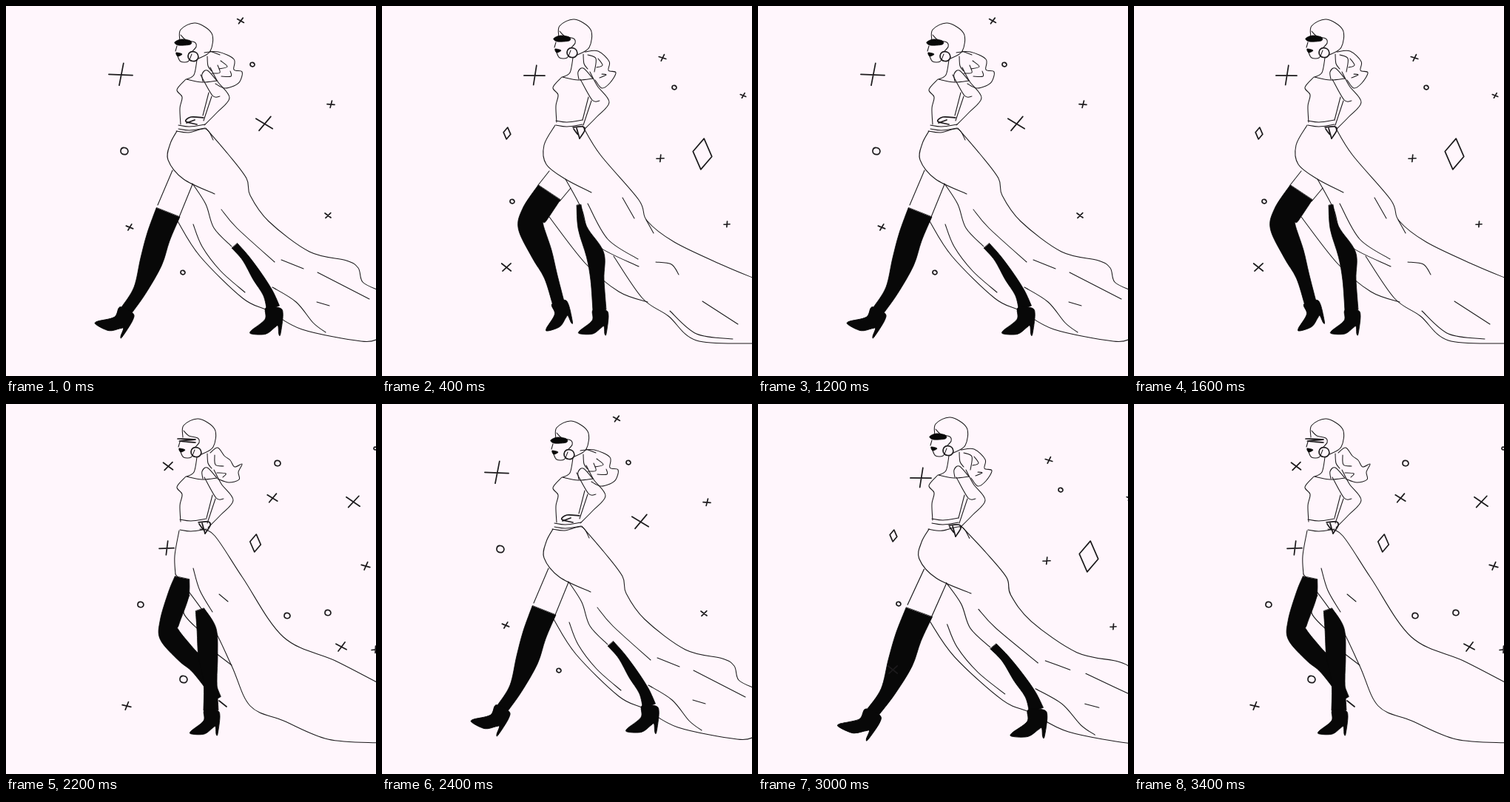
These frames come from a looping animation (500x500 px, 3600 ms). An HTML page:

```html
<!DOCTYPE html>
<html>
<head>
<meta charset="utf-8">
<title>Runway walk</title>
<style>
html, body { margin: 0; width: 100%; height: 100%; overflow: hidden; background: #fff6fc; }
svg { display: block; width: 100vw; height: 100vh; }
path { fill: none; stroke: #1c1a1c; stroke-width: 1.05; stroke-linecap: round; stroke-linejoin: round; }
path.fill { fill: #080808; stroke: #080808; stroke-width: .8; }
path.bold { stroke-width: 1.7; }
</style>
</head>
<body>
<svg id="stage" viewBox="0 0 500 500"></svg>
<script>
const parse = text => text.split(" ").map(p => p.split(",").map(Number));
const path = (d, kind = "") => `<path class="${kind}" d="${d}"/>`;
const group = (transform, content) => `<g transform="${transform}">${content}</g>`;
const move = (offset, content) => group(`translate(${offset})`, content);

// Smooth curve through the points.
function curve(points, closed) {
  const n = points.length;
  const at = i => closed ? points[(i + n) % n] : points[Math.max(0, Math.min(n - 1, i))];
  let d = "M" + points[0];
  for (let i = 0; i < (closed ? n : n - 1); i++) {
    const [a, b, c, e] = [at(i - 1), at(i), at(i + 1), at(i + 2)];
    const near = b.map((v, k) => v + (c[k] - a[k]) / 6);
    const far = c.map((v, k) => v - (e[k] - b[k]) / 6);
    d += `C${near} ${far} ${c}`;
  }
  return d;
}
const line = text => path(curve(parse(text)));
const bold = text => path(curve(parse(text)), "bold");
const blob = text => path(curve(parse(text), true), "fill");
const lines = (...texts) => texts.map(line).join("");

const shoeShape = blob("-9,0 -10,14 -27,28 -26,32 -9,32 2,24 6,22 7,32 9,32 12,8 8,0");

// A boot follows x,y,half-width stations; the shoe hangs on the last one.
function boot(stations, turn, size) {
  const spine = parse(stations);
  const side = sign => spine.map(([x, y, w], i) => {
    const [ax, ay] = spine[Math.max(0, i - 1)];
    const [bx, by] = spine[Math.min(spine.length - 1, i + 1)];
    const k = sign * w / Math.hypot(bx - ax, by - ay);
    return [x + (by - ay) * k, y - (bx - ax) * k];
  });
  const outline = curve(side(1)) + curve(side(-1).reverse()).replace("M", "L") + "Z";
  const [x, y] = spine.at(-1);
  const shoe = size ? group(`translate(${x} ${y}) rotate(${turn}) scale(${size})`, shoeShape) : "";
  return path(outline, "fill") + shoe;
}

function sparkle(item) {
  const [x, y, r] = item.slice(1).split(",").map(Number);
  const kind = item[0];
  const turn = kind === "+" ? (x * 7 + y) % 45 : 6;
  const shapes = {
    "+": `M${-r},${r * .1}L${r},${-r * .1}M${r * .1},${-r}L0,${r * .9}`,
    o: `M${r},0C${r},${r * 1.3} ${-r},${r * 1.2} ${-r},0S${r * .8},${-r * 1.2} ${r},0`,
    d: `M0,${-r}L${r * .62},${r * .1}L0,${r}L${-r * .62},${-r * .1}Z`
  };
  return group(`translate(${x} ${y}) rotate(${turn})`, path(shapes[kind], "bold"));
}
const sparkles = text => text.split(" ").map(sparkle).join("");

const head = lines(
  "239,43 240,27 260,18 282,32 280,56 264,66",
  "240,34 247,41 259,44 261,50 256,56",
  "235,49 233,56",
  "236,63 240,70 250,70 255,60"
) + blob("234,58 242,60 236,63") + sparkle("o257,63,7");
const shades = blob("232,44 241,40 253,42 253,47 237,48");
const scribble = bold("232,45 256,46 234,48 256,50");
const torso = lines(
  "258,70 254,90 244,96",
  "272,65 273,78 278,85",
  "244,96 265,100 285,98",
  "266,99 265,89 272,84 285,98",
  "243,96 231,110 238,120 235,135 236,157"
);
const arm = lines(
  "281,89 291,108 307,130 290,150 273,167",
  "268,99 284,127 294,128",
  "283,128 272,161",
  "279,123 271,154"
);
const waist = line("235,155 250,157 271,154");
const fist = bold("258,164 271,163 274,168 267,179") + bold("259,166 265,174 263,165 267,179");
const flatHand = bold("267,151 250,150 243,156 258,160") + bold("244,158 255,154");

const upper = (headAt, torsoAt, armAt, waistAt, depth, eyes, hand, tail) =>
  move(headAt, head + eyes) + move(torsoAt, torso) + move(armAt, arm) +
  move(waistAt, waist + move([0, depth], waist)) + hand + tail;

const contactTail = lines(
  "268,63 287,62 308,72 308,86 319,89 316,102 308,108 295,111 283,105",
  "276,61 289,66", "290,74 299,82 288,85", "286,80 289,90 278,91", "303,88 304,95 291,95"
);
const passTail = lines(
  "274,62 292,61 307,75 306,87 316,90 308,104 297,111 288,100",
  "278,66 289,71 287,89", "292,71 298,80 290,83", "297,92 303,93 294,97"
);
const riseTail = lines(
  "276,66 286,59 295,70 303,76 309,85 319,81 314,92 315,102 301,106 286,101",
  "282,69 283,82 294,84", "285,93 297,94 293,99"
);
const contactTop = upper([-4, 5], [0, 3], [-5, -6], [-2, 6], 5, shades, flatHand, contactTail);
const passTop = upper([0, 0], [0, 0], [0, 0], [0, 0], 6, shades, fist, passTail);
const riseTop = upper([0, 2], [0, 2], [0, 0], [0, 1], 14, scribble, move([2, -4], fist), riseTail);

const contactSkirt = lines(
  "231,169 222,186 219,208 240,234 282,254",
  "230,169 247,171 270,166 280,181",
  "270,165 300,200 325,233 330,256 355,291 410,332 460,344 476,354 482,373 503,384",
  "252,240 270,268 281,300 305,325",
  "360,380 392,400 415,428 432,441",
  "232,291 262,338 320,395 355,412 400,437 480,453 503,450",
  "253,295 265,325 290,358 323,387",
  "291,275 312,300 363,346",
  "372,343 402,355", "421,360 491,396", "420,400 437,405"
);
const passSkirt = lines(
  "234,161 219,188 222,214 248,234 283,252",
  "271,162 295,201 347,262 358,290 395,319 460,350 503,368",
  "357,289 367,307", "325,259 341,287",
  "278,267 305,315 346,342",
  "248,234 270,275 286,320 347,352",
  "370,346 391,349 401,363",
  "433,399 481,430",
  "389,412 425,443 474,450",
  "226,285 275,348 320,386 359,400",
  "313,338 352,395 387,419 425,452 503,456"
);
const riseSkirt = lines(
  "234,171 228,205 229,230",
  "262,169 282,178 320,235 375,315 445,347 503,377",
  "253,222 262,252 279,281", "288,257 300,267",
  "229,230 275,293 305,354 330,408 375,428 435,453 503,458",
  "248,258 240,282 260,305", "284,337 305,353"
);

const frontLeg = lines("225,222 205,269", "252,241 232,290") +
  boot("219,279,17 206,312,16 196,346,15 181,384,9 163,411,8", 25, 1.1);
const rearLeg = boot("309,324,5 324,341,5 340,366,7 354,388,7 361,408,9", 0, 1.1);
const contactLegs = frontLeg + rearLeg;
const strideLegs =
  group("translate(238 230) rotate(-15) scale(.95) translate(-238 -230)", frontLeg) +
  group("translate(262 260) rotate(8) scale(.93) translate(-262 -260)", rearLeg);
const passLegs = lines("226,223 211,242", "255,246 240,264") +
  boot("226,252,18 206,282,18 201,298,17 216,335,14 228,365,9 238,400,8", -20, 1) +
  boot("266,269,3 271,300,6 288,336,12 291,370,9 294,411,9", 0, 1);
const riseLegs = bold("288,401 298,409") +
  boot("238,235,10 233,258,14 221,295,13 221,312,14 243,338,13 262,357,11 286,398,5") +
  boot("262,278,6 271,305,13 273,340,13 276,375,9 277,414,10", 0, 1);

const contactStars = sparkles("+317,20,5 +155,93,16 o333,79,3 +439,133,5 +349,159,13 o160,196,5 +167,299,5 +435,283,5 o239,360,3");
const passStars = sparkles("+206,94,14 +379,70,5 o395,110,3 +488,121,4 d169,172,8 o176,264,3 +168,353,8 +376,206,5 d433,200,21 +466,295,4");
const riseStars = sparkles("+219,84,8 o367,80,4 +360,127,8 +469,132,11 d337,188,12 +217,195,10 +486,219,6 o182,271,4 o380,286,4 o435,282,4 +453,328,8 +499,332,5 +163,408,6 o240,372,5 o499,60,2");

const longStride = "translate(230 165) scale(1.115 1.022) translate(-230 -165)";
const poses = [
  contactTop + contactSkirt + contactLegs + contactStars,
  passTop + passSkirt + strideLegs + move([-18, -4], passStars),
  passTop + passSkirt + passLegs + passStars,
  passTop + group(longStride, contactSkirt + contactLegs) + move([14, 6], passStars),
  riseTop + riseSkirt + strideLegs + move([8, -5], riseStars),
  riseTop + riseSkirt + riseLegs + riseStars
];

const stage = document.getElementById("stage");
stage.innerHTML = poses.map(pose => `<g>${pose}</g>`).join("");
const groups = [...stage.children];
function tick() {
  const current = Math.floor(performance.now() / 200) % groups.length;
  groups.forEach((g, i) => g.style.display = i === current ? "" : "none");
  requestAnimationFrame(tick);
}
tick();
</script>
</body>
</html>
```
